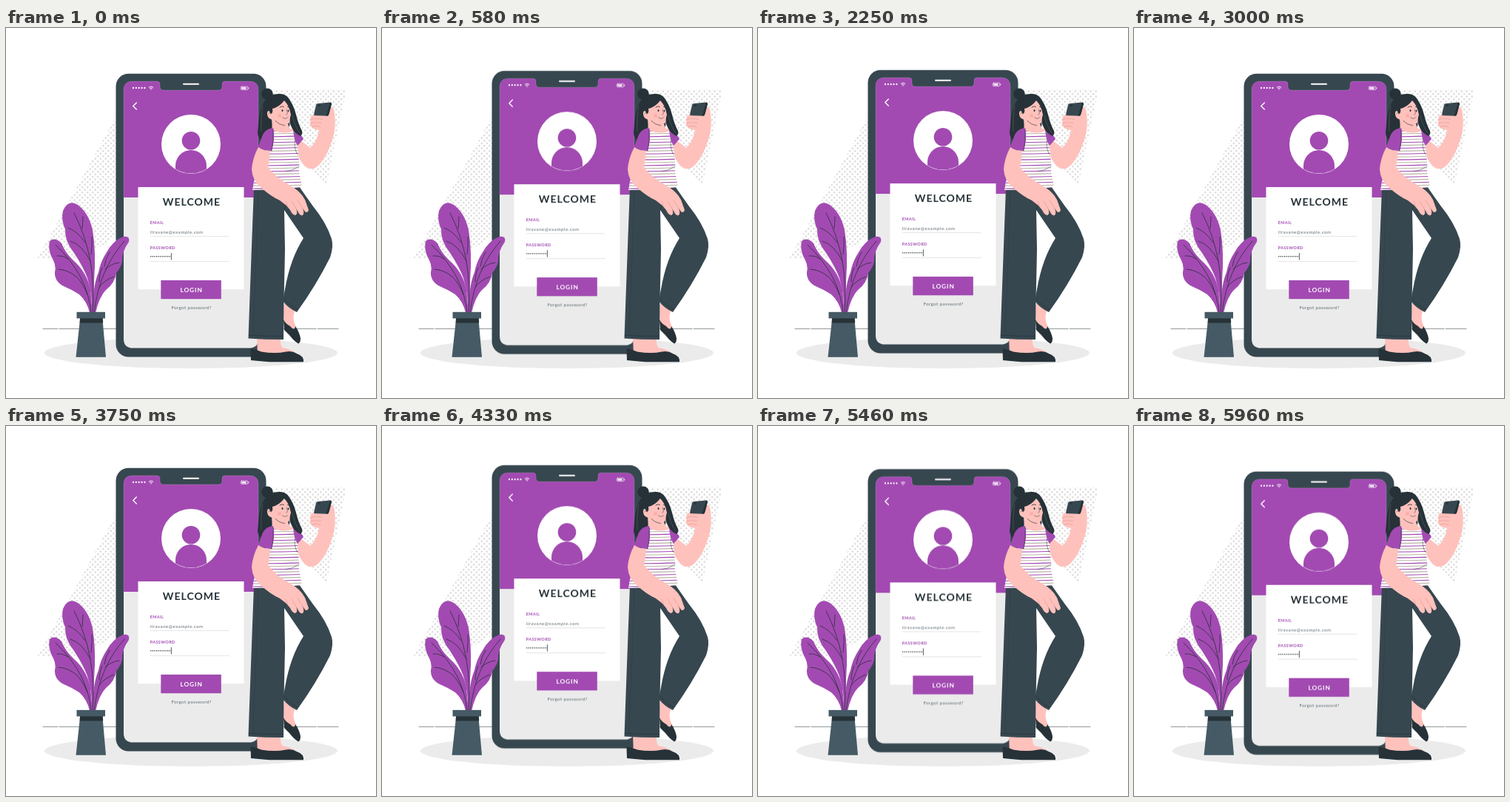
Recreate the animation shown at these times as an HTML page. Size 500 by 500 pixels, loop 6 s.

```html
<!DOCTYPE html>
<html lang="en">
<head>
<meta charset="utf-8">
<title>Login</title>
<style>
  html, body { margin: 0; width: 100%; height: 100%; overflow: hidden; background: #fff; }
  svg { display: block; width: 100%; height: 100%; }
  text { font-family: Lato, "Open Sans", sans-serif; }
  .bold { font-weight: 700; }
  .purple { fill: #a24ab2; }
  .slate { fill: #37474f; }
  .dark { fill: #263238; }
  .soft { fill: #5f6c73; }
  .skin { fill: #ffc1bc; }
  .pot { fill: #455a64; }
  .line { fill: none; stroke: #263238; stroke-width: .8; stroke-linecap: round; stroke-linejoin: round; }
  .thin { stroke-width: .5; }
  .white { fill: none; stroke: #fff; stroke-linecap: round; stroke-linejoin: round; }
  .crease { fill: none; stroke: #263238; stroke-width: .6; }
  .fold { fill: none; stroke: #e79b96; stroke-width: .7; stroke-linecap: round; }
</style>
</head>
<body>
<svg viewBox="0 0 500 500">
  <defs>
    <pattern id="dots" width="7" height="7" patternUnits="userSpaceOnUse">
      <g fill="#e0e0e0"><circle cx="1.75" cy="1.75" r="1.4"/><circle cx="5.25" cy="5.25" r="1.4"/></g>
    </pattern>
    <clipPath id="face"><circle cx="250" cy="157" r="39.6"/></clipPath>
    <clipPath id="shirt"><path d="M361 135Q375 139 390 138Q396 148 394 162Q397 184 396 194L400 215Q366 219 333 219Q336 195 348 182Q358 165 361 135Z"/></clipPath>
  </defs>

  <path fill="url(#dots)" d="M169 83V283H148L100 312H42ZM340 83H460L433 212L390 165L340 150Z"/>
  <ellipse cx="250" cy="439" rx="198" ry="21" fill="#ebebeb"/>
  <path class="line thin" d="M50 406.5H70M72 406.5H419M421 406.5H449"/>

  <g id="phone">
    <rect class="slate" x="148.5" y="61.800" width="203" height="382.700" rx="17"/>
    <path fill="#ebebeb" d="M159 228H341V420Q341 432.600 328 432.600H172Q159 432.600 159 420Z"/>
    <path class="purple" stroke="#fff" stroke-opacity=".3" stroke-width=".5" d="M159 229V84Q159 72 171 72H204Q208 72 208 76V79Q208 84 213 84H287Q292 84 292 79V76Q292 72 296 72H329Q341 72 341 84V229"/>
    <path class="white" stroke-width="2" d="M240 75.700H260"/>
    <g id="signal" fill="#fff"></g>
    <path class="white" stroke-width=".9" d="M193.200 80Q196 77.800 198.800 80M194.500 81.500Q196 80.300 197.500 81.500"/>
    <circle cx="196" cy="82.900" r=".6" fill="#fff"/>
    <rect class="white" x="317.400" y="79.200" width="9.400" height="4.200" rx="1" stroke-width=".7"/>
    <path fill="#fff" d="M318.400 80.200H324.500V82.400H318.400ZM327.300 80.400H328.200V82.200H327.300Z"/>
    <path class="white" stroke-width="1.4" d="M176.300 101L171.800 105.500L176.300 110"/>

    <circle cx="250" cy="157" r="40" fill="#fff"/>
    <g class="purple" clip-path="url(#face)">
      <circle cx="250" cy="152.200" r="12.300"/>
      <path d="M229 200V186A21 21 0 0 1 271 186V200Z"/>
    </g>

    <rect x="178.500" y="215" width="143" height="138.200" fill="#fff"/>
    <text class="dark bold" x="211.800" y="240.300" font-size="14" letter-spacing="1">WELCOME</text>
    <text class="purple bold" x="194.700" y="265.400" font-size="5.500" letter-spacing=".4">EMAIL</text>
    <text class="soft" x="194.800" y="278.200" font-size="6.200" letter-spacing=".5">liravane@example.com</text>
    <text class="purple bold" x="194.700" y="299" font-size="5.500" letter-spacing=".4">PASSWORD</text>
    <g id="secret" class="dark"></g>
    <path class="line" d="M223.400 304.500V313"/>
    <path fill="none" stroke="#d4d4d4" stroke-width=".6" d="M195 281.600H301M195 315.400H302"/>
    <rect class="purple" x="209.300" y="340.900" width="81.500" height="25.300"/>
    <text class="bold" x="235.400" y="356.900" font-size="8.400" letter-spacing=".9" fill="#fff">LOGIN</text>
    <text class="soft" x="223.400" y="380" font-size="6.300" letter-spacing=".35">Forgot password?</text>
  </g>

  <g id="woman">
    <!-- raised arm with its phone -->
    <path class="skin" d="M391 149Q401 153 411 162Q420 154 423 138Q414 137 411 131L411.500 120Q414 116 421 116L438 106Q443 106 444 116Q447 134 440 154Q434 172 424 184Q414 195 404 187Q396 179 391 162Z"/>
    <path class="slate" d="M421.500 102L438 100.500Q440.300 100.500 439.800 103L436.300 117Q435.800 118.800 434 118.800L418 118.300Q415.600 118.200 416.200 116L419 104Q419.600 102.200 421.500 102Z"/>
    <path class="dark" d="M438 100.500Q440.300 100.500 439.800 103L436.300 117Q435.800 118.800 434 118.800L432.500 118.700Z"/>
    <circle cx="423.300" cy="105" r="1.300" class="dark"/>
    <path class="skin" d="M436 118L440 107Q444 108 443 119L438 130Z"/>
    <path class="fold" d="M412 123.500Q418 121.500 427 123.500M411.500 128.500Q418 126.500 426 128.500M413 133Q419 131.500 425 133.500"/>

    <!-- back leg -->
    <path class="skin" d="M377 369L390 383Q387 391 390 399Q393 406 395 414L376 398Q374 383 377 369Z"/>
    <path class="dark" d="M375 394Q378 400 384 403Q390 410 391 403Q396 410 398 419Q398 426 395 426.500Q389 423 383 415L376 408Z"/>
    <path class="slate" d="M363 220L396 214Q405 227 415 241Q433 263 440 285Q443 295 438 310Q419 348 393 384Q382 379 374 369L377 353Q384 312 402 284L376 246Z"/>
    <path class="crease" d="M375 364.500Q384 376 395 380.500"/>

    <!-- front leg -->
    <path class="skin" d="M339 416H371Q370 429 374 432Q384 434 390 438L377 445H340Z"/>
    <path class="dark" d="M330.500 433.500Q337 434 345 437.500Q364 440.500 378 437.500Q387 436 393 440Q403 443.500 402 451.300H356Q345 450.500 331 449Z"/>
    <path class="slate" d="M335 216Q367 221 396 214Q383 229 376 246L377 300L375.500 370L375 421Q350 421 327.500 419.500Q331 320 335 216Z"/>
    <path class="crease" d="M328 415Q351 417 375 416.500M376 246Q377 235 381 228"/>
    <path class="crease" d="M341 222Q338 320 333.500 415" opacity=".5"/>

    <!-- hair behind -->
    <circle class="dark" cx="353" cy="89.300" r="7.800"/>
    <path class="dark" d="M348 101Q355 89 368 89Q381 88 385 102L383 134L361 137L350 154Q338 150 340.500 137Q341 116 348 101Z"/>

    <path class="skin" d="M359 123L360 137Q369 147 386 140L379 126Z"/>
    <g clip-path="url(#shirt)">
      <rect x="330" y="130" width="75" height="92" fill="#fff"/>
      <g id="stripes" fill="none"></g>
    </g>
    <path class="line thin" d="M391 150Q388 161 394 171M396 187Q387 193 378 194"/>
    <path class="skin" d="M360 132Q371 140 387 136L389 139Q373 145 359 137Z"/>
    <path class="purple" d="M388 137Q399 143 402 150L394 159Q389 152 388 137Z"/>
    <path class="purple" d="M361 135Q351 136 347 144L340.500 161Q348 166 359 166Q364 150 361 135Z"/>
    <path class="line thin" d="M361 137Q362 152 359 166"/>

    <!-- face, fringe and front lock -->
    <path class="skin" d="M358 105Q364 96 375 96Q384 100 385 113Q386 127 380 131Q371 133 362 124Q354 124 353 117Q352 111 358 112Z"/>
    <path class="dark" d="M356 113Q351 99 361 92Q373 86 381 94Q388 102 392 117Q395 130 400 139Q401 144 398 146Q389 142 385 132Q382 126 385 117Q383 105 376 98Q369 107 360 109Q361 115 358 116Z"/>
    <path class="line thin" d="M354.800 116Q356 113 358 116M379 110Q382 116 378.700 117.500M373.600 121.200Q378 124 381 120.500"/>
    <path class="line" d="M370 107Q373 104.700 375.500 106.500M380.400 106.500Q382.600 106 383.500 108"/>
    <ellipse class="dark" cx="373.500" cy="111.500" rx="1" ry="1.500"/>
    <ellipse class="dark" cx="381.500" cy="112" rx=".9" ry="1.400"/>
    <circle cx="369.500" cy="118.500" r="2.500" fill="#f7a59f" opacity=".6"/>
    <path class="crease" d="M364 125Q369 131 377 131.500"/>
    <path class="white" stroke-width=".4" d="M387 118Q390 133 397 142M347 106Q344 122 345 140" opacity=".35"/>

    <!-- lowered arm -->
    <path class="skin" d="M341 161Q348 166 357 166Q356 179 354 188Q366 203 381 211Q398 220 404 232L409 246Q408 249.500 405 249Q402 246 400 242Q404 250 401 253Q398 254.500 395 249L392 244Q395 251 391 253Q387 253 384 246L379 240Q374 236 370 233Q357 227 344 215Q333 206 332 191Q333 176 341 161Z"/>
    <path class="fold" d="M400 242L394 233M392 244L386 234M381 241L378 234"/>
  </g>

  <g id="plant">
    <path class="purple" d="M113 385Q110 370 99 360Q88 353 76 348Q65 341 66 330Q68 322 64 314Q56 300 59 288Q66 282 75 291Q80 304 92 315Q109 330 114 353L117 385Z"/>
    <path class="purple" d="M116 385Q117 360 110 338Q105 324 92 304Q79 288 80 272Q74 259 77 247Q84 231 97 239Q112 250 117 273Q122 303 119 342L118 385Z"/>
    <path class="purple" d="M118 385Q116 352 125 330Q128 315 136 303Q144 288 158 282Q168 280 166 289Q156 303 157 316Q155 324 149 331Q147 345 135 354Q126 363 121 385Z"/>
    <path class="line" stroke-width="1.500" d="M115 385Q111 335 67 293M117 385Q123 310 92 250M119 385Q126 326 160 288"/>
    <path class="line" d="M71 326Q84 327 95 336Q104 345 110 360M69 308Q76 307 84 312M84 270Q97 275 107 290M87 288Q103 293 114 315M104 255Q104 262 103 271M116 282Q117 293 115 306M133 322Q134 312 140 303M126 343Q126 332 130 324M153 317Q143 318 134 326M146 336Q134 340 126 350"/>
    <path class="pot" d="M100 394H130.500L135 444.700H94.500Z"/>
    <path class="dark" d="M100 391H130.800L131.200 398.500H99.700Z"/>
    <rect class="pot" x="95.500" y="383.800" width="38.500" height="8.600"/>
  </g>
</svg>
<script>
  const NS = "http://www.w3.org/2000/svg";
  const byId = id => document.getElementById(id);

  function add(parent, tag, attrs) {
    const el = document.createElementNS(NS, tag);
    for (const key in attrs) el.setAttribute(key, attrs[key]);
    parent.appendChild(el);
  }

  function dotRow(id, count, x, y, step, r) {
    for (let i = 0; i < count; i++) add(byId(id), "circle", { cx: x + i * step, cy: y, r });
  }

  dotRow("signal", 5, 172, 81, 3.85, 1.15);
  dotRow("secret", 11, 195.8, 308.7, 2.55, 0.75);

  for (let i = 0; i < 21; i++) {
    const y = 138 + i * 3.9;
    add(byId("stripes"), "path", {
      d: `M330 ${y + 1}Q366 ${y + 1.5} 403 ${y}`,
      stroke: i % 2 ? "#b9b3a6" : "#a24ab2",
      "stroke-width": 1.1
    });
  }

  byId("phone").animate(
    [0, -10, 0].map(y => ({ transform: `translateY(${y}px)` })),
    { duration: 3000, iterations: Infinity, easing: "linear" }
  );
</script>
</body>
</html>
```
